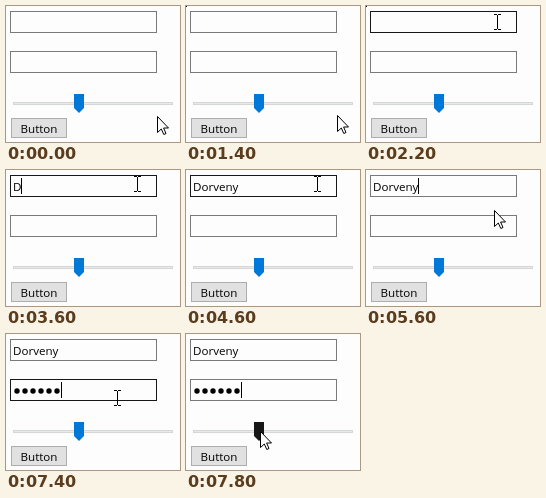
Write an HTML page that moves like this. It is 174 px wide and 136 px high and loops after 8 s.

```html
<!DOCTYPE html>
<html lang="en">
<meta charset="utf-8">
<title>Form demo</title>
<style>
  html, body { margin: 0; width: 100%; height: 100%; overflow: hidden; background: #fdfdfd }
  svg { display: block; width: 174px; height: 136px; shape-rendering: crispEdges }
  text { font: 11.6px "Open Sans", "Noto Sans", sans-serif }
  .smooth { shape-rendering: geometricPrecision }
  .field { fill: #fdfdfd; stroke: #7a7a7a }
  .field.hover { stroke: #171717 }
</style>
<svg viewBox="0 0 174 136">
  <rect id="corner" width="1" height="1"/>
  <rect id="field1" class="field" x="4.5" y="5.5" width="146" height="21"/>
  <rect id="field2" class="field" x="4.5" y="45.5" width="146" height="21"/>
  <text id="name" x="7" y="21"></text>
  <g id="dots" class="smooth"></g>
  <rect id="caret" width="1" height="16"/>
  <rect x="7.5" y="96.5" width="159" height="2" fill="#e7eaea" stroke="#d6d6d6"/>
  <path id="thumb" class="smooth" d="M68 88h10v14l-5 5-5-5z"/>
  <rect x="5.5" y="112.5" width="55" height="19" fill="#e1e1e1" stroke="#adadad"/>
  <text x="33" y="127" text-anchor="middle">Button</text>
  <path id="arrow" class="smooth" fill="#fdfdfd" stroke="#000"
    d="M.5 .5V16.5L4.3 13L6.8 18.5L9 17.5L6.6 12H11.5Z"/>
  <path id="beam" fill="none" stroke="#000" d="M-1 -7.5h3M3 -7.5h3M2.5 -7V7M-1 7.5h3M3 7.5h3"/>
</svg>
<script>
const LOOP = 8000, STEP = 200;
const NAME = 'Dorveny', DOTS = 6;
const $ = id => document.getElementById(id);

const ramp = (t, from, to) => Math.min(1, Math.max(0, (t - from) / (to - from)));
const glide = (t, from, to) => {
  const u = ramp(t, from, to);
  return u * u * u * (u * (6 * u - 15) + 10);
};
const between = (t, from, to) => t >= from && t < to;
const show = (node, on) => node.setAttribute('visibility', on ? 'visible' : 'hidden');
const place = (id, x, y) => $(id).setAttribute('transform', `translate(${x} ${y})`);

for (let i = 0; i < DOTS; i++) {
  const dot = document.createElementNS('http://www.w3.org/2000/svg', 'circle');
  dot.setAttribute('cx', 11 + 8 * i);
  dot.setAttribute('cy', 57);
  dot.setAttribute('r', 2.7);
  $('dots').append(dot);
}

// The pointer glides to the name field, the password field, then the slider.
function pointerAt(t) {
  const toName = glide(t, 1300, 2370);
  const toPassword = glide(t, 5000, 5900);
  const toSlider = glide(t, 7120, 7800);
  return [
    Math.floor(151.5 - 22.5 * toName - toPassword - 54 * toSlider),
    Math.floor(110 - 96 * toName + 34 * toPassword + 49 * toSlider)
  ];
}

function draw(t) {
  const [x, y] = pointerAt(t);
  const over1 = between(y, 5, 27), over2 = between(y, 45, 67);
  $('field1').classList.toggle('hover', over1);
  $('field2').classList.toggle('hover', over2);
  show($('arrow'), !over1 && !over2);
  show($('beam'), over1 || over2);
  place('arrow', x, y);
  place('beam', x, y);

  // The name is typed in two bursts, the password at a steady pace.
  const letters = Math.floor(2 * ramp(t, 3400, 3800) + 5 * ramp(t, 4000, 4600));
  const dots = Math.round(DOTS * ramp(t, 5800, 7000));
  $('name').textContent = NAME.slice(0, letters);
  [...$('dots').children].forEach((dot, i) => show(dot, i < dots));

  if (t < 5800) place('caret', 7 + Math.round($('name').getComputedTextLength()), 8);
  else place('caret', 7 + 8 * dots, 48);
  show($('caret'), between(t, 2600, 3200) || between(t, 3600, 4600) || t >= 5200);

  show($('corner'), between(t, 400, 2600));
  $('thumb').setAttribute('fill', t >= 7800 ? '#171717' : '#0078d7');
}

function tick() {
  const t = performance.now() % LOOP;
  draw(t - t % STEP);
  requestAnimationFrame(tick);
}
tick();
</script>
</html>
```
